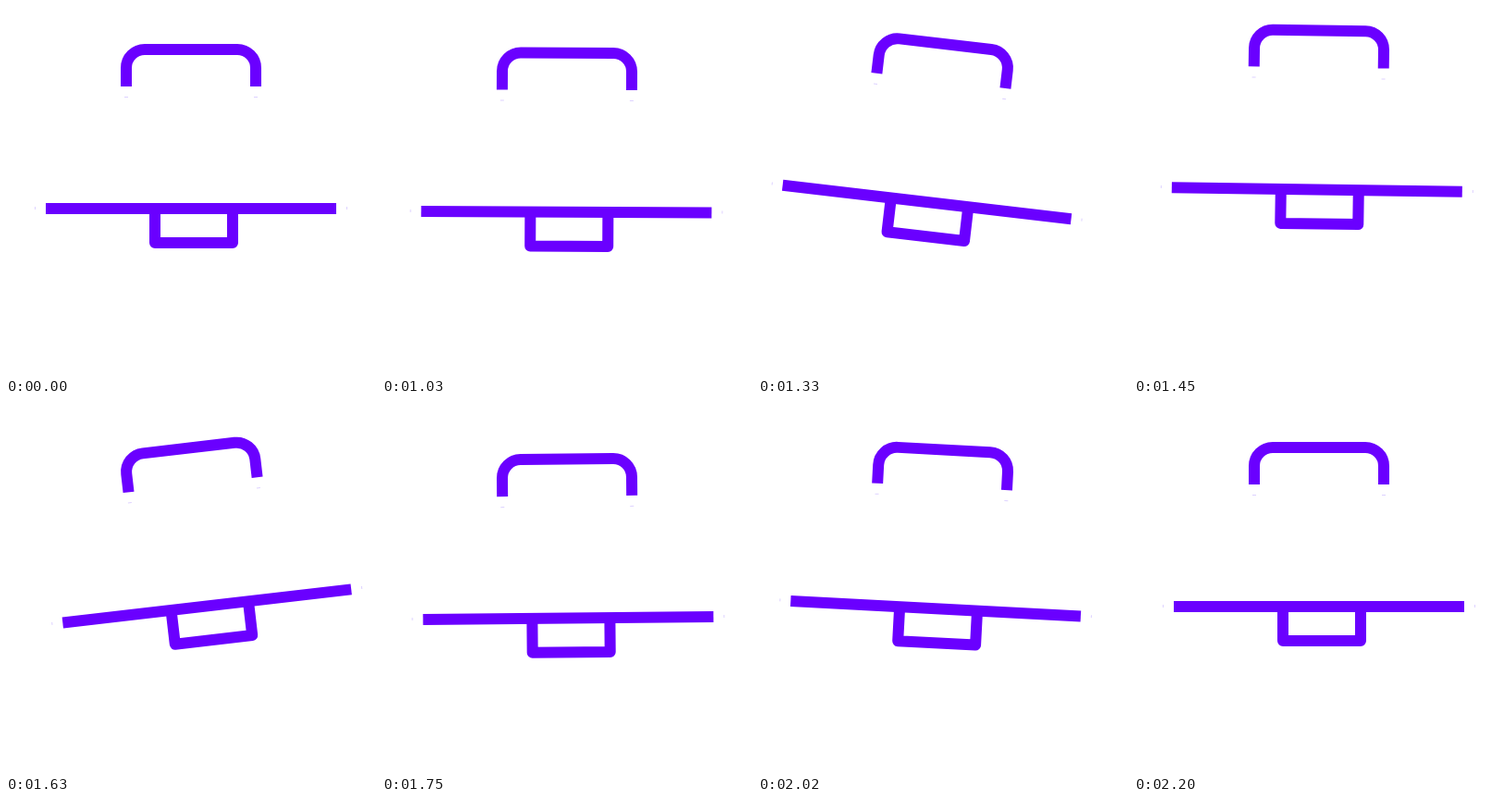
An HTML page that plays this animation: 400x400 px, repeating every 2.23 s.

```html
<!DOCTYPE html>
<html lang="en">
<head>
<meta charset="utf-8">
<title>Briefcase</title>
<style>
  html, body { margin: 0; width: 100%; height: 100%; overflow: hidden; background: #fff; }
  svg { display: block; width: 100%; height: 100%; }

  .case {
    --t: 0;
    fill: none;
    stroke: #6a00ff;
    stroke-width: 12;
    stroke-linejoin: round;
    transform-origin: 200px 69px;
    animation: bounce 1200ms both paused, swing 1200ms both paused;
    animation-timing-function: cubic-bezier(.33, 0, .67, 1);
    animation-delay: calc(var(--t) * -1ms);
  }
  .ticks { stroke: #ddd2ff; stroke-width: 1; }

  @keyframes bounce {
    0% { translate: 0 0; animation-timing-function: cubic-bezier(.3, .15, .6, 1); }
    19.17% { translate: 0 36px; }
    32.08% { translate: 0 -23px; }
    66.67% { translate: 0 14px; }
    91.67%, 100% { translate: 0 0; }
  }
  @keyframes swing {
    0% { rotate: 0deg; animation-timing-function: cubic-bezier(.33, 0, .42, 1); }
    24.17% { rotate: 7deg; animation-timing-function: cubic-bezier(.48, 0, .6, 1); }
    50.83% { rotate: -6.8deg; }
    73.33% { rotate: 5.1deg; }
    100% { rotate: 0deg; }
  }
</style>
</head>
<body>
<svg viewBox="0 0 400 400">
  <g class="case">
    <path d="M130 87V67A20 20 0 0 1 150 47H250A20 20 0 0 1 270 67V87"/>
    <path d="M43 219H357"/>
    <path d="M161 219V256H245V219"/>
    <path class="ticks" d="M128 98.5h4M268 98.5h4M31.5 217v3M368.5 217v3"/>
  </g>
</svg>
<script>
  const LOOP = 2230, REST = 1000, STEP = 30;
  const box = document.querySelector('.case');

  // The pose advances in 30 ms steps after the rest.
  function draw() {
    const t = Math.max(0, performance.now() % LOOP - REST);
    box.style.setProperty('--t', Math.floor(t / STEP) * STEP);
    requestAnimationFrame(draw);
  }
  draw();
</script>
</body>
</html>
```
